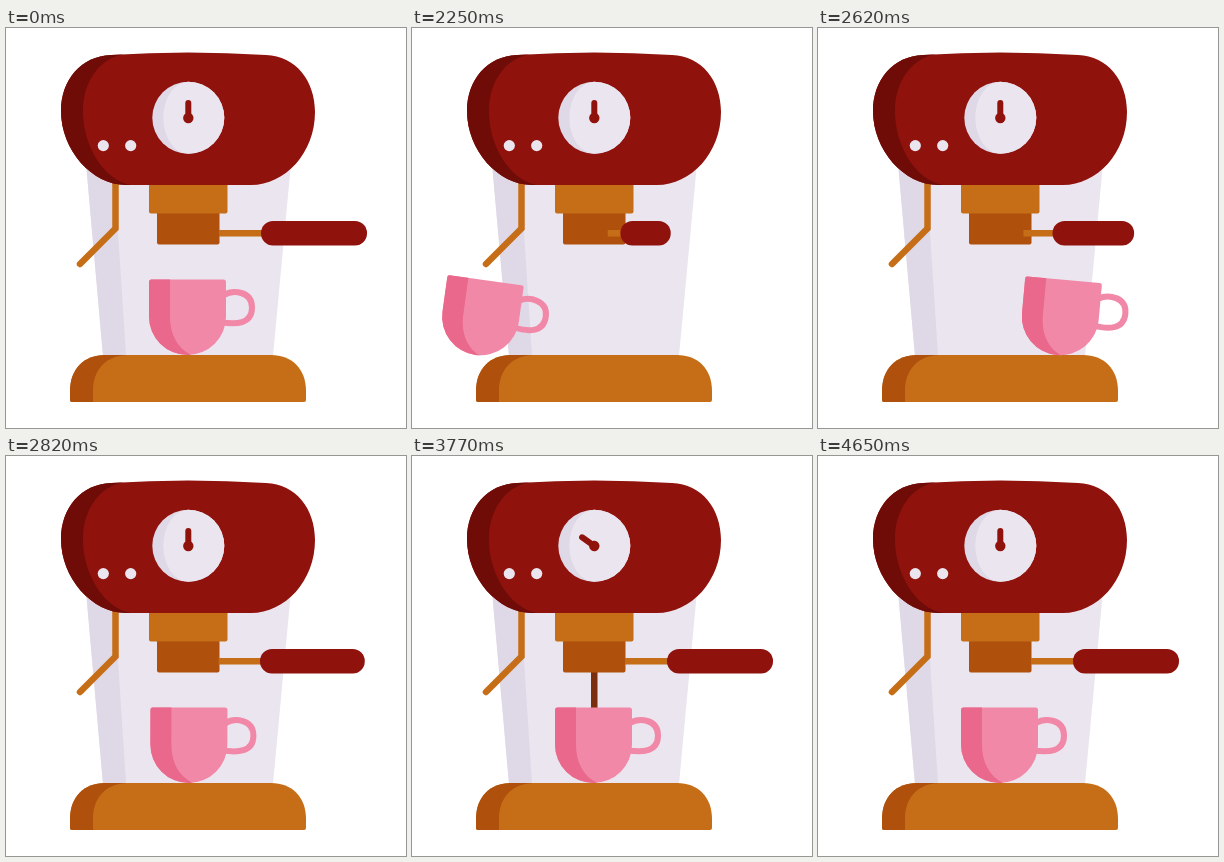
These frames come from a looping animation (400x400 px, 4670 ms). An HTML page with a canvas:

```html
<!DOCTYPE html>
<html lang="en">
<head>
<meta charset="utf-8">
<title>Espresso machine</title>
<style>
  html, body { margin: 0; width: 100%; height: 100%; overflow: hidden; background: #fff; }
  canvas { display: block; width: 100vmin; height: 100vmin; }
</style>
</head>
<body>
<canvas id="stage" width="400" height="400"></canvas>
<script>
const ctx = document.getElementById('stage').getContext('2d');
const LOOP = 4670;
const RED = '#90120c', DARK_RED = '#6f0c08';
const ORANGE = '#c66e17', BROWN = '#af500c', COFFEE = '#7a2e0e';
const PALE = '#eae5ee', PALE_SHADE = '#dfd8e6';
const PINK = '#f288a8', DARK_PINK = '#e9688b';

const shapes = {
  body: new Path2D('M80 135H285L267 328H97Z'),
  bodyShade: new Path2D('M80 135H107.5L120 328H97Z'),
  wand: new Path2D('M109.5 150V200.5L74 236'),
  head: new Path2D('M105 27Q182 22 260 27C290 28 309 53 309 84C309 125 279 157 245 157H120C86 157 55 122 55 83C55 52 75 28 105 27Z'),
  headShade: new Path2D('M50 20H118V26C92 31 77 55 77 83C77 117 97 152 125 157V160H50Z'),
  base: new Path2D('M64 363C64 341 78 327 99 327H265C286 327 300 341 300 363V372Q300 374 298 374H66Q64 374 64 372Z'),
  baseShade: new Path2D('M60 320H122V327C101 327 87 341 87 363V376H60Z'),
  cup: new Path2D('M145 251.5H217.5Q220 251.5 220 254V288.5A38.5 38.5 0 0 1 143 288.5V254Q143 251.5 145 251.5Z'),
  cupShade: new Path2D('M140 248H164V288.5C164 307 172 322 188 328H140Z'),
  cupHandle: new Path2D('M218 267C227 261.5 246 263 246 279.5C246 296 230 297 214 294')
};

const progress = (t, start, duration) => Math.min(1, Math.max(0, (t - start) / duration));
const easeOut = (p, power) => 1 - (1 - p) ** power;

function fill(path, color) {
  ctx.fillStyle = color;
  ctx.fill(path);
}

function shaded(path, color, shade, shadeColor) {
  fill(path, color);
  ctx.save();
  ctx.clip(path);
  fill(shade, shadeColor);
  ctx.restore();
}

function stroke(path, color, width, cap = 'butt') {
  ctx.strokeStyle = color;
  ctx.lineWidth = width;
  ctx.lineCap = cap;
  ctx.stroke(path);
}

function box(x, y, w, h, radius, color) {
  const path = new Path2D();
  path.roundRect(x, y, w, h, radius);
  fill(path, color);
}

function disc(x, y, r, color) {
  const path = new Path2D();
  path.arc(x, y, r, 0, Math.PI * 2);
  fill(path, color);
}

function drawStream(amount) {
  const length = 86 * amount;
  if (length > 0) box(179, 212, 6.5, 4 + length, [0, 0, 3, 3], COFFEE);
}

function drawPortafilter(turn) {
  box(151, 183, 62.5, 33.5, 2, BROWN);
  const left = 255 - 62 * turn, right = 361 - 136 * turn, rod = 213 - 23 * turn;
  box(rod, 202, left + 8 - rod, 6.5, 0, ORANGE);
  box(left, 193, right - left, 24.5, 12, RED);
}

function drawDial(degrees) {
  const face = new Path2D(), lit = new Path2D();
  face.arc(182.3, 89.7, 36, 0, Math.PI * 2);
  lit.arc(182.3, 89.7, 36, -Math.PI / 2, Math.PI / 2);
  lit.ellipse(182.3, 89.7, 25, 36, 0, Math.PI / 2, Math.PI * 1.5);
  fill(face, PALE_SHADE);
  fill(lit, PALE);
  ctx.save();
  ctx.translate(182.3, 90);
  ctx.rotate(degrees * Math.PI / 180);
  stroke(new Path2D('M0 0V-15'), RED, 6, 'round');
  disc(0, 0, 5.2, RED);
  ctx.restore();
}

function drawHead(needle) {
  box(143, 150, 78.5, 35.5, 2, ORANGE);
  shaded(shapes.head, RED, shapes.headShade, DARK_RED);
  disc(97.3, 117.6, 5.6, PALE);
  disc(124.7, 117.6, 5.6, PALE);
  drawDial(needle);
}

function drawCup(shift, degrees) {
  ctx.save();
  ctx.translate(181.5 + shift, 327);
  ctx.rotate(degrees * Math.PI / 180);
  ctx.translate(-181.5, -327);
  stroke(shapes.cupHandle, PINK, 6);
  shaded(shapes.cup, PINK, shapes.cupShade, DARK_PINK);
  ctx.restore();
}

// The used cup leaves on the left, a clean one slides in from the right.
function cupPose(t) {
  if (t < 2400) {
    const out = progress(t, 2000, 400) ** 2;
    return [-300 * out, 20 * out];
  }
  const rest = 1 - easeOut(progress(t, 2400, 500), 3);
  return [330 * rest, 30 * rest];
}

function handleTurn(t) {
  return t < 2500
    ? easeOut(progress(t, 2000, 500), 2)
    : 1 - easeOut(progress(t, 2500, 500), 4);
}

function brewing(t) {
  return t < 3700
    ? easeOut(progress(t, 2900, 750), 2)
    : 1 - easeOut(progress(t, 3700, 900), 2);
}

function draw(t) {
  const brew = brewing(t);
  ctx.fillStyle = '#fff';
  ctx.fillRect(0, 0, 400, 400);
  fill(shapes.body, PALE);
  fill(shapes.bodyShade, PALE_SHADE);
  stroke(shapes.wand, ORANGE, 6.5, 'round');
  shaded(shapes.base, ORANGE, shapes.baseShade, BROWN);
  drawStream(brew);
  drawPortafilter(handleTurn(t));
  drawHead(360 * brew);
  drawCup(...cupPose(t));
}

const begin = performance.now();
function tick() {
  draw((performance.now() - begin) % LOOP);
  requestAnimationFrame(tick);
}
tick();
</script>
</body>
</html>
```
